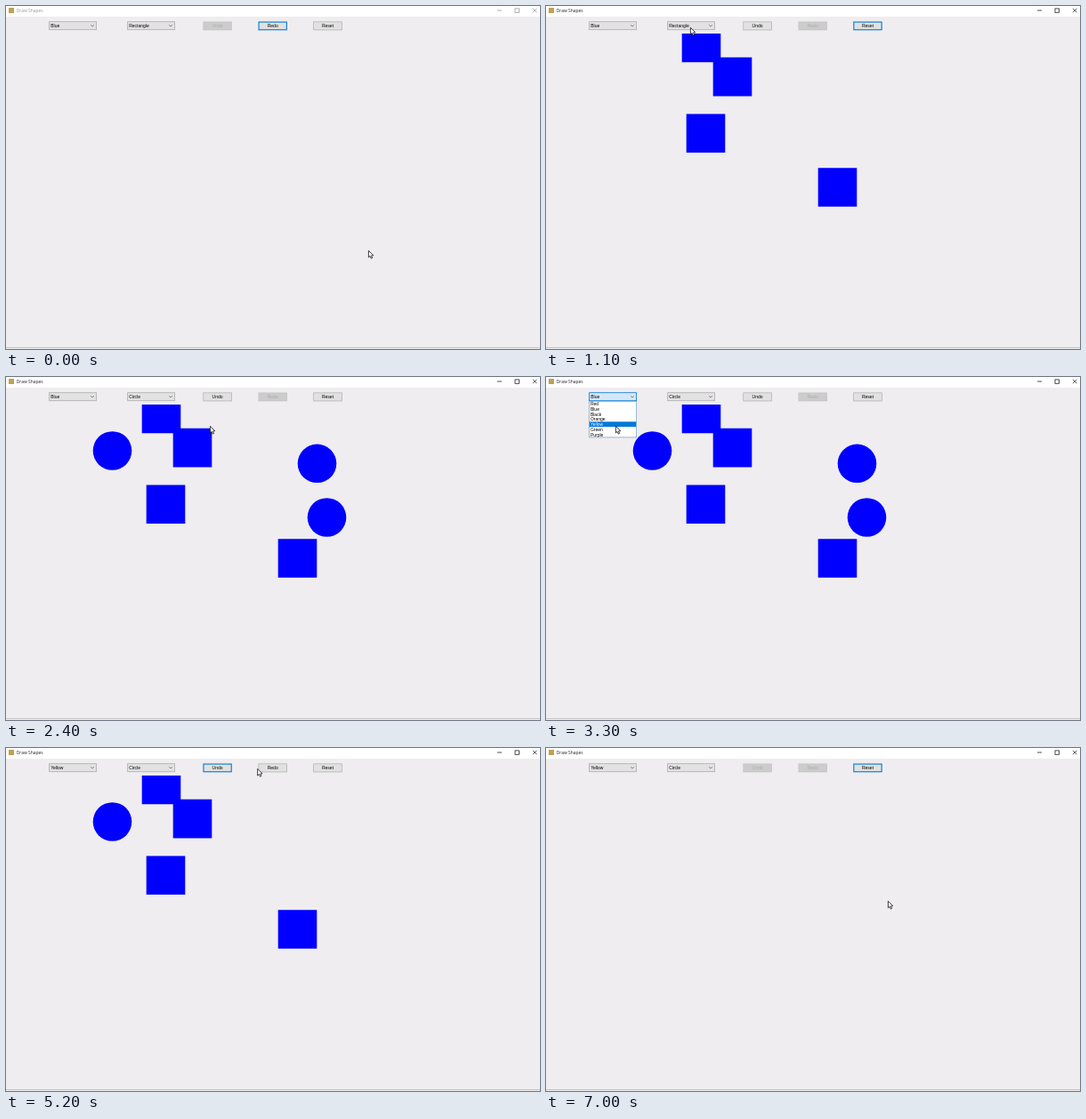
An HTML page with a canvas that plays this animation: 600 px wide and 386 px high, repeating every 7100 ms.

```html
<!DOCTYPE html>
<html lang="en">
<head>
<meta charset="utf-8">
<title>Draw Shapes</title>
<style>
  html, body { margin: 0; width: 100%; height: 100%; overflow: hidden; background: #efedef; }
  canvas { display: block; }
</style>
</head>
<body>
<canvas id="stage" width="600" height="386"></canvas>
<script>
const ctx = document.getElementById('stage').getContext('2d');
const STEP = 100, STEPS = 71;
const ACCENT = '#0078d7', FACE = '#efedef';
const TOP = 17.5, HEIGHT = 9.8, RADIUS = 21.8, ROW = 5.75;
const combos = {
  color: { x: 48.2, items: ['Red', 'Blue', 'Black', 'Orange', 'Yellow', 'Green', 'Purple'] },
  kind: { x: 136.2, items: ['Rectangle', 'Circle'] }
};

// The user's session: where the mouse is at a step and what its click does there
const session = [];
const go = (step, x, y, action) => session.push({ step, x, y, action });
const repeat = (n, step, x, y, action) => { for (let i = 0; i < n; i++) go(step + i, x, y, action); };

go(0, 407, 275);
go(4, 327.5, 204, 'draw');
go(6, 179.5, 143.2, 'draw');
go(9, 209.5, 79.6, 'draw');
go(10, 174.5, 41.5, 'draw');
go(11, 162, 24);
go(12, 162, 24, 'openKind');
go(15, 158, 36, 'pick');
go(18, 119.5, 83, 'draw');
go(20, 360.5, 158, 'draw');
go(22, 349.5, 97.3, 'draw');
go(24, 229, 55);
go(27, 76, 23, 'openColor');
go(33, 78, 55);
go(34, 78, 55, 'pick');
go(36, 291, 144.3, 'draw');
go(38, 250, 200.5, 'draw');
go(41, 300.5, 230, 'draw');
go(44, 232, 23.5);
repeat(5, 45, 232, 23.5, 'undo');
repeat(4, 53, 299, 23, 'redo');
go(60, 347, 23);
go(63, 354, 23, 'reset');
go(67, 395, 120);
go(70, 384, 172);

const rowAt = y => Math.floor((y - 27.5) / ROW);

const actions = {
  draw(s, x, y) {
    s.shapes.push({ x, y, color: s.color, kind: s.kind });
    s.undone = [];
    if (s.focus === 'Redo') s.focus = 'Reset';
  },
  openKind(s) { s.open = 'kind'; s.focus = ''; },
  openColor(s) { s.open = 'color'; s.focus = ''; },
  pick(s, x, y) { s[s.open] = combos[s.open].items[rowAt(y)]; s.open = ''; },
  undo(s) { s.undone.push(s.shapes.pop()); s.focus = 'Undo'; },
  redo(s) { s.shapes.push(s.undone.pop()); s.focus = 'Redo'; },
  reset(s) { s.shapes = []; s.undone = []; s.focus = 'Reset'; }
};

function stateAt(step) {
  const s = { color: 'Blue', kind: 'Rectangle', shapes: [], undone: [{}], focus: 'Redo', open: '' };
  for (const e of session) if (e.action && e.step <= step) actions[e.action](s, e.x, e.y);
  return s;
}

function mouseAt(step) {
  const i = Math.max(1, session.findIndex(e => e.step >= step));
  const a = session[i - 1], b = session[i];
  const p = (step - a.step) / (b.step - a.step);
  return { x: a.x + (b.x - a.x) * p, y: a.y + (b.y - a.y) * p };
}

function fillRect(x, y, w, h, color) {
  ctx.fillStyle = color;
  ctx.fillRect(x, y, w, h);
}

function box(x, y, w, h, fill, border, line = 0.8) {
  fillRect(x, y, w, h, border);
  fillRect(x + line, y + line, w - 2 * line, h - 2 * line, fill);
}

function text(str, x, y, color = '#000', align = 'left', font = '5px "Liberation Sans", Arial, sans-serif') {
  ctx.font = font;
  ctx.textAlign = align;
  ctx.fillStyle = color;
  ctx.fillText(str, x, y);
}

function line(color, width, ...points) {
  ctx.strokeStyle = color;
  ctx.lineWidth = width;
  ctx.beginPath();
  for (const [x, y] of points) ctx.lineTo(x, y);
  ctx.stroke();
}

function titleBar(active) {
  const ink = active ? '#222' : '#999';
  fillRect(0, 0, 600, 12, '#fff');
  fillRect(3, 2, 6, 6, '#c2a050');
  text('Draw Shapes', 11.8, 7.2, ink, 'left', '4.9px "Open Sans", "Noto Sans", sans-serif');
  line(ink, 0.8, [552, 5], [557, 5]);
  ctx.strokeRect(572, 2.9, 4.4, 4.4);
  line(ink, 0.8, [592, 2.8], [596.4, 7.2]);
  line(ink, 0.8, [596.4, 2.8], [592, 7.2]);
}

function button(label, x, enabled, focused, mouse) {
  const w = 32.4;
  const hover = enabled && mouse.x >= x && mouse.x <= x + w && mouse.y >= TOP && mouse.y <= TOP + HEIGHT;
  const fill = !enabled ? '#cccccc' : hover ? '#e5f1fb' : '#e1e1e1';
  const border = !enabled ? '#c3c3c3' : focused || hover ? ACCENT : '#adadad';
  box(x, TOP, w, HEIGHT, fill, border, focused ? 1.1 : 0.7);
  text(label, x + w / 2, 24.2, enabled ? '#000' : '#aaa', 'center');
}

function combo({ x }, label, hot) {
  box(x, TOP - 0.2, 53.8, HEIGHT, hot ? '#d5e7f6' : '#e2e2e2', hot ? ACCENT : '#adadad');
  text(label, x + 2, 24.1);
  line('#555', 0.7, [x + 47, 21.3], [x + 48.8, 23], [x + 50.6, 21.3]);
}

function dropdown({ x, items }, current, mouse) {
  const row = rowAt(mouse.y);
  const selected = row < 0 ? items.indexOf(current) : row;
  box(x, 27, 53.8, items.length * ROW + 1, '#fff', '#6f9cc4', 0.7);
  items.forEach((item, i) => {
    const y = 27.3 + i * ROW;
    if (i === selected) fillRect(x + 0.7, y, 52.4, ROW, ACCENT);
    text(item, x + 1.7, y + 4.7, i === selected ? '#fff' : '#000');
  });
}

function drawShapes(shapes) {
  ctx.save();
  ctx.beginPath();
  ctx.rect(0, 31, 600, 353);
  ctx.clip();
  for (const { x, y, color, kind } of shapes) {
    ctx.fillStyle = color;
    ctx.beginPath();
    if (kind === 'Circle') ctx.arc(x, y, RADIUS, 0, 2 * Math.PI);
    else ctx.rect(x - RADIUS, y - RADIUS, 2 * RADIUS, 2 * RADIUS);
    ctx.fill();
  }
  ctx.restore();
}

const arrow = new Path2D('M0 0V7.6L1.7 6.1L2.9 8.8L4.2 8.2L3.1 5.6L5.4 5.4Z');

function pointer({ x, y }) {
  ctx.save();
  ctx.translate(x + 0.4, y + 0.3);
  ctx.fillStyle = '#fff';
  ctx.fill(arrow);
  ctx.strokeStyle = '#111';
  ctx.lineWidth = 0.8;
  ctx.stroke(arrow);
  ctx.restore();
}

function draw(step) {
  const mouse = mouseAt(step), s = stateAt(step);
  fillRect(0, 0, 600, 386, FACE);
  fillRect(0, 384, 600, 1, '#c4c4c4');
  titleBar(step > 0);
  drawShapes(s.shapes);
  for (const name in combos) combo(combos[name], s[name], s.open === name);
  button('Undo', 221.4, s.shapes.length > 0, s.focus === 'Undo', mouse);
  button('Redo', 283.5, s.undone.length > 0, s.focus === 'Redo', mouse);
  button('Reset', 345.3, true, s.focus === 'Reset', mouse);
  if (s.open) dropdown(combos[s.open], s[s.open], mouse);
  pointer(mouse);
}

function tick() {
  draw(Math.floor(performance.now() / STEP) % STEPS);
  requestAnimationFrame(tick);
}
tick();
</script>
</body>
</html>
```
